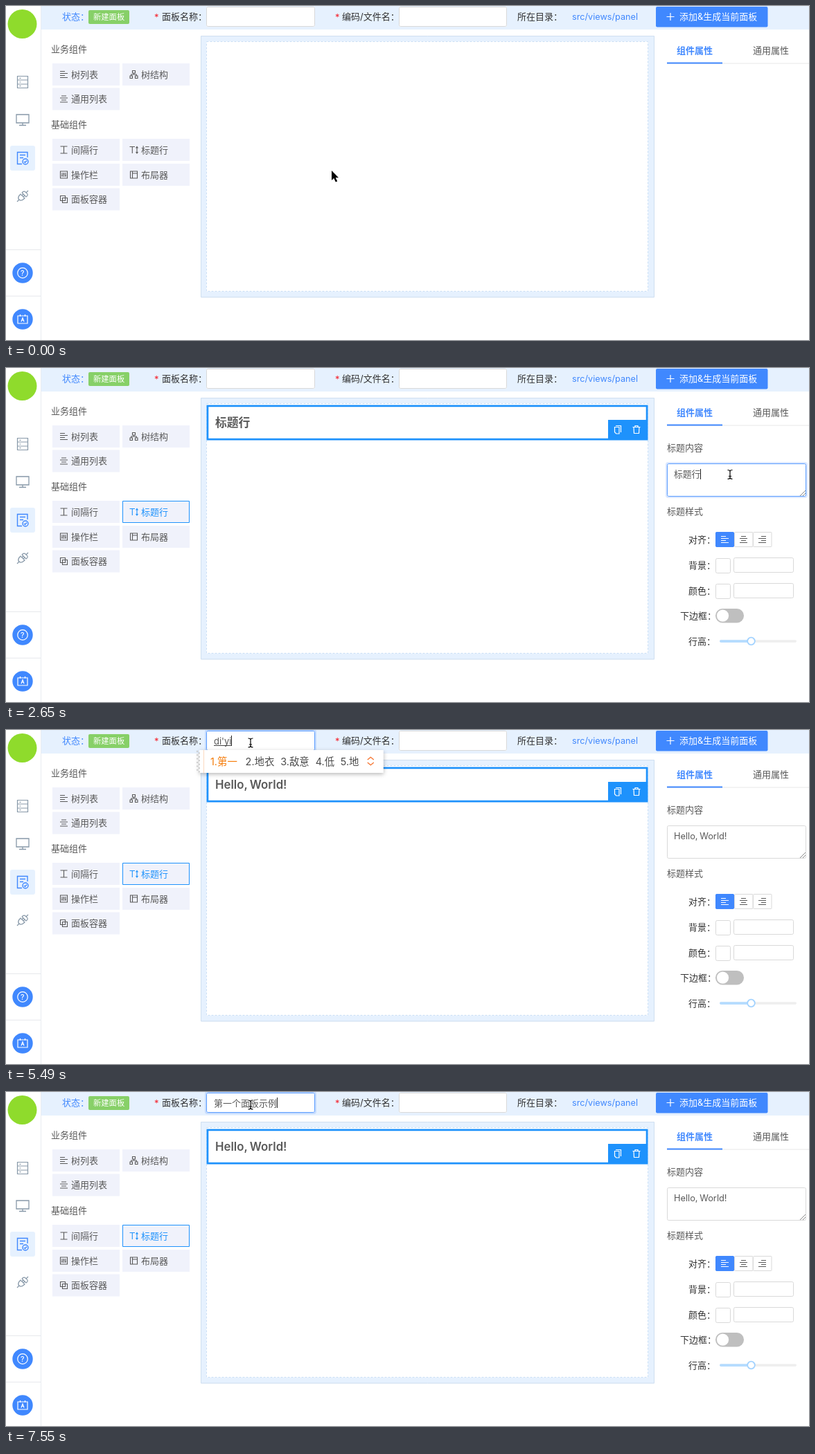
These frames come from a looping animation (1159 by 483 pixels, 8 s). An HTML page with a canvas:

```html
<!DOCTYPE html>
<html lang="zh-CN">
<head>
<meta charset="utf-8">
<title>Panel designer</title>
<style>
html, body { margin: 0; width: 100%; height: 100%; overflow: hidden; background: #fff; }
canvas { display: block; width: 1159px; height: 483px; }
</style>
</head>
<body>
<canvas id="stage"></canvas>
<script>
const W = 1159, H = 483, LOOP = 8000;
const BLUE = '#4088fe', SKY = '#1e92fc', PALE = '#e6f1fe', INK = '#595959', DARK = '#303030', GRAY = '#d9d9d9';
const FONT = 'Inter, "Noto Sans CJK SC", "Noto Sans CJK", sans-serif';
const canvas = document.getElementById('stage');
const c = canvas.getContext('2d');
const dpr = window.devicePixelRatio || 1;
canvas.width = W * dpr;
canvas.height = H * dpr;

function text(s, x, y, color = INK, size = 13, weight = 400) {
  c.font = `${weight} ${size}px ${FONT}`;
  c.wordSpacing = `${-size * 0.07}px`;
  c.fillStyle = color;
  c.fillText(s, x, y + size * 0.365);
  return c.measureText(s).width;
}

function box(x, y, w, h, fill, stroke, r = 0, lw = 1) {
  c.beginPath();
  c.roundRect(x, y, w, h, r);
  if (fill) { c.fillStyle = fill; c.fill(); }
  if (!stroke) return;
  c.beginPath();
  c.roundRect(x + lw / 2, y + lw / 2, w - lw, h - lw, r);
  c.strokeStyle = stroke;
  c.lineWidth = lw;
  c.stroke();
}

function disc(x, y, r, fill, stroke, lw = 1) {
  c.beginPath();
  c.arc(x, y, r, 0, Math.PI * 2);
  if (fill) { c.fillStyle = fill; c.fill(); }
  if (stroke) { c.strokeStyle = stroke; c.lineWidth = lw; c.stroke(); }
}

function icon(x, y, d, color, lw = 1.1) {
  c.save();
  c.translate(x, y);
  c.strokeStyle = color;
  c.lineWidth = lw;
  c.stroke(new Path2D(d));
  c.restore();
}

function dashed(x, y, w, h, fill, stroke, dash) {
  c.setLineDash(dash);
  box(x, y, w, h, fill, stroke);
  c.setLineDash([]);
}

function field(x, y, w, h, focus) {
  if (focus) box(x - 2, y - 2, w + 4, h + 4, 'rgba(64,136,254,.2)', null, 4);
  box(x, y, w, h, '#fff', focus ? '#5b9dff' : GRAY, 2);
}

// Icon paths are centred on 0,0
const ICONS = {
  left: 'M-5.5-4.5H1.5M-5.5-1.5H5.5M-5.5 1.5H1.5M-5.5 4.5H5.5',
  center: 'M-3.5-4.5H3.5M-5.5-1.5H5.5M-3.5 1.5H3.5M-5.5 4.5H5.5',
  right: 'M-1.5-4.5H5.5M-5.5-1.5H5.5M-1.5 1.5H5.5M-5.5 4.5H5.5',
  tree: 'M-2-5.5H2V-2H-2ZM-5.5 2H-2V5.5H-5.5ZM2 2H5.5V5.5H2ZM0-2V0M-3.8 2V0H3.8V2',
  gap: 'M-5-5H5M-5 5H5M0-5V5',
  title: 'M-6-4.5H1.5M-2.2-4.5V5M4.5-4V4.5M3-2.5L4.5-4.5L6-2.5M3 3L4.5 5L6 3',
  tools: 'M-5-5H5V5H-5ZM-2.5-3V3M0-3V3M2.5-3V3M-3.5 1H-1.5M-1-1H1M1.5 1H3.5',
  layout: 'M-5-5H5V5H-5ZM-2-5V5M-2-2H5',
  nest: 'M-5-5H2V2H-5ZM-2-2H5V5H-2Z',
  copy: 'M-3-5.5H4.5V4M-4.5-3.5H2V6H-2.2L-4.5 3.7Z',
  trash: 'M-5.5-3.5H5.5M-2-3.5V-5.5H2V-3.5M-4-3.5L-3.5 5.5H3.5L4-3.5',
  data: 'M-7.5-8.5H7.5V8.5H-7.5ZM-7.5-3H7.5M-7.5 3H7.5M-4.5-5.7H-2.5M-4.5 0H-2.5M-4.5 5.7H-2.5',
  screen: 'M-9-7H9V5H-9ZM0 5V8.5M-5 8.5H5',
  form: 'M7-1V-8.5H-7.5V8.5H-1M-4-4.5H4M-4-.5H1M8 5A4 4 0 1 1 0 5A4 4 0 1 1 8 5M2 5L3.5 6.5L6 3.5',
  plug: 'M-8 8L-5 5M8-8L5-5M-5 5C-8 2-5-1-3-3L3 3C1 5-2 8-5 5M-1-5L5 1C8-1 8-3 5-5C3-8 1-7-1-5M-1-1L1-3M1 1L3-1',
  card: 'M-7-5H7V6H-7ZM-3.5-7V-4M3.5-7V-4M-2 3.5L0-2L2 3.5M-1.2 1.5H1.2'
};

const PARTS = [
  ['树列表', 'left', 0, 83], ['树结构', 'tree', 1, 83], ['通用列表', 'center', 0, 118.5],
  ['间隔行', 'gap', 0, 192], ['标题行', 'title', 1, 192], ['操作栏', 'tools', 0, 228],
  ['布局器', 'layout', 1, 228], ['面板容器', 'nest', 0, 263.5]
];

function sidebar() {
  box(50, 0, 1, H, '#e9ecf1');
  box(0, 352, 50, 1, '#e6e8ec');
  box(0, 419, 50, 1, '#e6e8ec');
  disc(23.5, 26, 21, '#8fdb2c');
  box(6, 202, 36, 36, PALE, null, 3);
  icon(24, 110, ICONS.data, '#8798a8', 1.2);
  icon(24, 164, ICONS.screen, '#8798a8', 1.3);
  icon(24, 220, ICONS.form, BLUE, 1.4);
  icon(24, 275, ICONS.plug, '#8798a8', 1.2);
  disc(24, 386, 14.7, BLUE);
  disc(24, 386, 7.3, null, '#fff', 1.2);
  text('?', 21, 386.3, '#fff', 10.5, 500);
  disc(24, 453, 14.7, BLUE);
  icon(24, 453, ICONS.card, '#fff', 1.2);
}

function header(focus) {
  box(51, 0, W - 51, 34, PALE);
  text('状态：', 81, 15.5, BLUE);
  box(119, 6, 59, 20, '#87d068', null, 2);
  text('新建面板', 126, 16, '#fff', 11.3);
  text('*', 214, 16, '#f5222d');
  text('面板名称：', 225, 15.5, DARK);
  field(289, 1, 157, 29, focus);
  text('*', 475, 16, '#f5222d');
  text('编码/文件名：', 485, 15.5, DARK);
  field(567, 1, 156, 29);
  text('所在目录：', 738, 15.5, DARK);
  text('src/views/panel', 817, 15.5, BLUE, 12.7);
  box(938, 1, 161.5, 29.5, BLUE, null, 2);
  icon(959, 15.5, 'M-5.5 0H5.5M0-5.5V5.5', '#fff', 1.2);
  text('添加&生成当前面板', 972, 15.5, '#fff');
}

function palette(state) {
  text('业务组件', 65, 62);
  text('基础组件', 65, 171);
  for (const [name, glyph, col, y] of PARTS) {
    const x = 67 + col * 101;
    const lit = glyph === 'title' && state;
    const color = lit ? SKY : INK;
    if (lit === 'hover') dashed(x, y, 97, 32, '#f0f2fb', SKY, [3, 2]);
    else box(x, y, 97, 32, '#f0f2fb', lit ? SKY : null);
    icon(x + 16.5, y + 16, ICONS[glyph], color);
    text(name, x + 27, y + 16, color);
  }
}

function board() {
  box(281, 43, 655, 378.5, PALE, '#cfdff0');
  dashed(289, 51, 638, 362, '#fff', '#cbdff5', [3, 2]);
}

function tabs() {
  box(954, 82.5, W - 954, 1, '#e8e8e8');
  box(954, 81.6, 80, 1.9, BLUE);
  text('组件属性', 968, 64, BLUE, 13, 600);
  text('通用属性', 1078, 64);
}

function titleRow(title) {
  box(289.5, 53.5, 637, 51, '#fff', SKY, 0, 2.8);
  text(title, 302, 79, INK, 16.8, 600);
  box(869, 75, 57, 29, SKY);
  icon(883, 89, ICONS.copy, '#fff', 1.2);
  icon(910, 89, ICONS.trash, '#fff', 1.2);
}

function settings(title, focus, selected) {
  text('标题内容', 954, 115);
  field(954, 138, 201, 48, focus);
  if (selected) box(964, 145, 39, 17, '#b3d7ff');
  const w = text(title, 964, 153, INK, 12.8);
  if (focus && !selected) box(964 + Math.round(w), 146, 1, 15, '#222');
  icon(1150, 181, 'M-4 4L4-4M0 4L4 0', '#888', 1);
  text('标题样式', 954, 207);
  [['对齐：', 985, 248], ['背景：', 985, 285], ['颜色：', 985, 322], ['下边框：', 973, 358], ['行高：', 985, 395]]
    .forEach(([s, x, y]) => text(s, x, y, DARK));
  ['left', 'center', 'right'].forEach((a, i) => {
    box(1024 + i * 27, 237, i ? 27.5 : 27, 22, i ? '#fff' : BLUE, i ? GRAY : BLUE, i ? 1 : 2);
    icon(1037.5 + i * 27, 248, ICONS[a], i ? INK : '#fff');
  });
  for (const y of [274, 311]) {
    box(1024, y + 1, 22, 22, '#fff', GRAY, 2);
    field(1050, y, 87, 22);
  }
  box(1024, 348, 41, 20.5, '#bfbfbf', null, 10);
  disc(1034.5, 358.2, 8.6, '#fff');
  box(1030, 393.3, 111, 3.6, '#efefef', null, 2);
  box(1030, 393.3, 45, 3.6, '#b5dcff', null, 2);
  disc(1075.5, 395, 5.3, '#fff', '#a3d3ff', 1.8);
}

// Name entry: start time, committed text, pinyin, candidates
const TYPING = [
  [0, '', ''],
  [5190, '', 'd', '的 到 大 都 等'],
  [5340, '', "di'y", '第一 地狱 抵押 低 地'],
  [5490, '', "di'yi", '第一 地衣 敌意 低 地'],
  [5790, '', "di'yi'ge", '第一个 第一格 第一歌 第一 地衣'],
  [6230, '第一个', ''],
  [6380, '第一个', 'm', '吗 没 们 买 每'],
  [6530, '第一个', 'mian', '面 免 棉 面对 面试'],
  [6680, '第一个', "mian'ban", '面板上 面板数 面板 免办 面板灯'],
  [6820, '第一个面板', ''],
  [6970, '第一个面板', 's', '是 上 说 时 ↑'],
  [7120, '第一个面板', 'shi', '是 时 事 使 十'],
  [7260, '第一个面板', "shi'li", '示例 实力 实例 势力 示例图'],
  [7550, '第一个面板示例', '']
];

function nameEntry(t) {
  const [, done, pinyin, words] = TYPING.filter(k => k[0] <= t).pop();
  const x = 300 + text(done, 300, 16);
  const w = text(pinyin, x, 16);
  if (pinyin) box(x, 22, w, 1, '#444');
  if (t < 4590 || t >= 5040) box(Math.round(x + w), 8, 1, 15, '#222');
  return words ? [x - 25, words.split(' ')] : null;
}

function candidates(x, words) {
  const labels = words.map((s, i) => `${i + 1}.${s}`);
  const steps = words.map(s => 36 + (s.length - 1) * 14.6);
  const w = steps.reduce((a, b) => a + b, 0) + 46;
  c.save();
  c.shadowColor = 'rgba(0,0,0,.28)';
  c.shadowBlur = 6 * dpr;
  c.shadowOffsetY = 2 * dpr;
  box(x + 4, 29, w - 4, 33, '#fff');
  c.restore();
  c.fillStyle = '#c4c4c4';
  for (let i = 0; i < 12; i++) c.fillRect(x + (i % 2) * 3, 30 + i * 2.7, 2, 1.5);
  box(x + 10, 29, 1, 33, '#fbd9c0');
  let px = x + 20;
  labels.forEach((s, i) => {
    text(s, px, 46, i ? '#4a4a4a' : '#f57c0a', 14.4);
    px += steps[i];
  });
  icon(x + w - 18.5, 45, 'M-4.5-2L0-5.7L4.5-2M-4.5 2L0 5.7L4.5 2', '#f5722c', 1.3);
}

const ARROW = new Path2D('M0 0V14L3.2 11L5.8 16.5L8.2 15.4L5.7 10.2H10Z');
const MOVE = new Path2D('M0-7L3-4H1V-1H4V-3L7 0L4 3V1H1V4H3L0 7L-3 4H-1V1H-4V3L-7 0L-4-3V-1H-1V-4H-3Z');
const BEAM = new Path2D('M-3.5-6.5Q0-6.5 0-4.5Q0-6.5 3.5-6.5M0-4.5V4.5M-2 2.5H2M-3.5 6.5Q0 6.5 0 4.5Q0 6.5 3.5 6.5');

function pointer(x, y, kind) {
  c.save();
  c.translate(x, y);
  c.lineJoin = 'round';
  c.strokeStyle = '#fff';
  c.lineWidth = kind === 'beam' ? 3 : 2;
  const shape = { arrow: ARROW, move: MOVE, beam: BEAM }[kind];
  c.stroke(shape);
  if (kind === 'beam') {
    c.strokeStyle = '#000';
    c.lineWidth = 1.2;
    c.stroke(shape);
  } else {
    c.fillStyle = '#000';
    c.fill(shape);
  }
  c.restore();
}

// Pointer stops: tick, x, y
const PATH = [[0, 470, 238], [5, 222, 203], [9, 222, 203], [14, 625, 211], [15, 640, 200],
  [18, 1045, 154], [20, 1045, 154], [24, 431.5, 58.5], [25, 412, 52], [28, 353, 18.5], [99, 353, 18.5]];

function pointerAt(tick) {
  const i = PATH.findIndex(p => p[0] > tick);
  const [t0, x0, y0] = PATH[i - 1], [t1, x1, y1] = PATH[i];
  const p = (tick - t0) / (t1 - t0), e = p * p * (3 - 2 * p);
  return [x0 + (x1 - x0) * e, y0 + (y1 - y0) * e];
}

function pointerKind(x, y, placed) {
  if (!placed) return 'arrow';
  if (x > 954 && y > 138 && y < 186) return 'beam';
  if (x > 289 && x < 446 && y < 30) return 'beam';
  return x > 290 && x < 926 && y > 51 && y < 104 ? 'move' : 'arrow';
}

function draw(t) {
  const tick = Math.floor((t + 24) / 148);
  const [x, y] = pointerAt(tick);
  const placed = tick >= 15, naming = tick >= 28;
  c.setTransform(dpr, 0, 0, dpr, 0, 0);
  box(0, 0, W, H, '#fff');
  sidebar();
  header(naming);
  palette(placed ? 'active' : tick >= 5 ? 'hover' : '');
  board();
  tabs();
  if (!placed && tick > 9 && x > 289) box(869, 51, 55, 3, SKY);
  if (placed) {
    const title = tick < 20 ? '标题行' : 'Hello, World!';
    titleRow(title);
    settings(title, tick >= 18 && !naming, tick === 19);
  }
  const popup = naming && nameEntry(t);
  if (popup) candidates(...popup);
  pointer(x, y, pointerKind(x, y, placed));
}

function loop() {
  draw(performance.now() % LOOP);
  requestAnimationFrame(loop);
}
loop();
</script>
</body>
</html>
```
